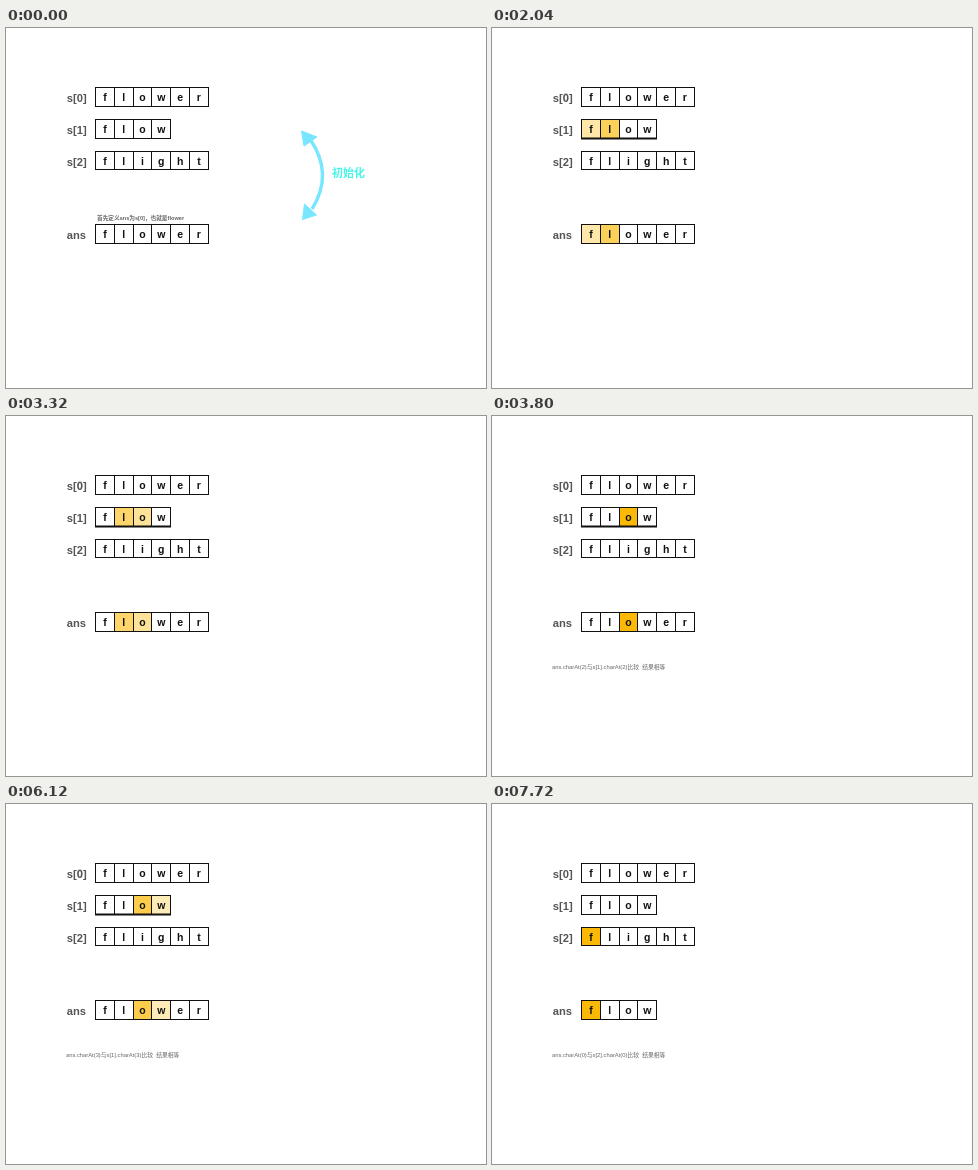
Animation of 480 by 360 pixels, one loop 8 s. Source, as an HTML page:

```html
<!DOCTYPE html>
<html>
<head>
<meta charset="utf-8">
<title>Longest common prefix</title>
<style>
html, body { margin: 0; width: 100%; height: 100%; overflow: hidden; background: #fff; }
svg { display: block; width: 480px; height: 360px; }
text { font-family: "Liberation Sans", "Noto Sans CJK SC", "Noto Sans CJK", sans-serif; white-space: pre; }
.label { font-size: 11.2px; font-weight: bold; fill: #555; }
.letter { font-size: 10.5px; font-weight: bold; fill: #111; text-anchor: middle; }
.note { font-size: 5.8px; fill: #666; }
.line { fill: none; stroke: #111; stroke-width: 1; }
.mark { fill: #fbb905; }
</style>
</head>
<body>
<svg id="stage" viewBox="0 0 480 360"></svg>
<script>
const LOOP = 8000, LEFT = 89.5, CELL = 18.8;
const NS = "http://www.w3.org/2000/svg";
const stage = document.getElementById("stage");

function add(parent, tag, attrs, text) {
  const el = document.createElementNS(NS, tag);
  for (const key in attrs) el.setAttribute(key, attrs[key]);
  if (text) el.textContent = text;
  parent.appendChild(el);
  return el;
}

const group = () => add(stage, "g", {});
const edge = i => Math.floor(LEFT + i * CELL) + 0.5;
const clamp = v => Math.min(1, Math.max(0, v));
const within = (t, from, to) => t >= from && t < to ? 1 : 0;
const show = (el, alpha) => el.setAttribute("opacity", alpha);

function addLabel(parent, name, y) {
  add(parent, "text", { class: "label", x: 60.8, y: y + 14 }, name);
}

// A row of boxed letters; returns the highlight of each cell.
function addWord(parent, word, y, height) {
  const marks = [...word].map((ch, i) => add(parent, "rect", {
    class: "mark", x: edge(i), y, width: edge(i + 1) - edge(i), height, opacity: 0
  }));
  add(parent, "rect", { class: "line", x: edge(0), y, width: edge(word.length) - edge(0), height });
  [...word].forEach((ch, i) => {
    if (i) add(parent, "path", { class: "line", d: `M${edge(i)} ${y}v${height}` });
    add(parent, "text", { class: "letter", x: LEFT + (i + 0.5) * CELL, y: y + 13.5 }, ch);
  });
  return marks;
}

const base = group();
["s[0]", "s[1]", "s[2]"].forEach((name, i) => addLabel(base, name, 59.5 + i * 32));
addLabel(base, "ans", 196.5);
addWord(base, "flower", 59.5, 19);
const second = addWord(base, "flow", 91.5, 19);
const third = addWord(base, "flight", 123.5, 18);

const fullAns = group(), shortAns = group();
const fullMarks = addWord(fullAns, "flower", 196.5, 19);
const shortMarks = addWord(shortAns, "flow", 196.5, 19);
show(shortMarks[0], 1);

// Doubled outlines visible while the second word is compared
const doubled = group();
add(doubled, "path", { d: `M89 110.5H${edge(4) + 0.5}`, stroke: "#111", "stroke-width": 2 });
add(doubled, "text", { class: "label", x: 70.8, y: 72.6, opacity: 0.35 }, "0");

const intro = group();
add(intro, "text", { class: "note", x: 91, y: 192, style: "font-weight:bold;font-size:5.65px" },
  "首先定义ans为s[0]，也就是flower");
add(intro, "path", { d: "M304 111Q328 146 306 181", fill: "none", stroke: "#78e6ff", "stroke-width": 3.4 });
add(intro, "path", { d: "M295.5 103L311 109L298 118ZM296.5 191.5L298.5 176L310.5 187Z",
  fill: "#78e6ff", stroke: "#78e6ff", "stroke-width": 1, "stroke-linejoin": "round" });
add(intro, "text", { x: 326, y: 149.3, fill: "#48f5e8", "font-size": 11, "font-weight": "bold" }, "初始化");

const compare = (word, i, gap) =>
  `ans.charAt(${i})与s[${word}].charAt(${i})比较${gap}结果相等`;

// text, start, end, fade-in time, fade-out time
const notes = [
  ["接下来从s[1]开始，将ans与数组中的每个字符串逐个字符进行比较，保留相等部分作为ans", 480, 1000, 0, 0],
  [compare(1, 0, " "), 1000, 1720, 0, 200],
  [compare(1, 1, "  "), 2160, 3160, 200, 200],
  [compare(1, 2, "  "), 3600, 4600, 200, 200],
  [compare(1, 3, "  "), 5040, 6760, 200, 0],
  ["ans与s[1]比较完毕，截取公共前缀flow给ans", 6760, 7720, 0, 0],
  [compare(2, 0, "  "), 7720, LOOP, 0, 0]
].map(([text, from, to, rise, fall]) => ({
  el: add(stage, "text", { class: "note", x: 60, y: 253 }, text), from, to, rise, fall
}));

function noteAlpha(n, t) {
  const up = n.rise ? clamp((t - n.from) / n.rise) : 1;
  const down = n.fall ? clamp((n.to - t) / n.fall) : 1;
  return within(t, n.from, n.to) * up * down;
}

// Each move dissolves the highlight from one cell to the next.
const moves = [1620, 3060, 5940];
const moved = (i, t) => clamp((t - moves[i]) / 640);

function draw(t) {
  show(intro, within(t, 0, 1000));
  show(doubled, within(t, 1000, 6760));
  show(fullAns, within(t, 0, 7240));
  show(shortAns, within(t, 7240, LOOP));
  show(shortMarks[0], within(t, 7720, LOOP));
  show(third[0], within(t, 7720, LOOP));
  for (let i = 0; i < 4; i++) {
    const rise = i ? moved(i - 1, t) : 1;
    const fall = i < 3 ? 1 - moved(i, t) : 1;
    const alpha = within(t, 1000, 7240) * rise * fall;
    show(second[i], alpha);
    show(fullMarks[i], alpha);
  }
  for (const n of notes) show(n.el, noteAlpha(n, t));
}

const begin = performance.now();
function tick() {
  draw((performance.now() - begin) % LOOP);
  requestAnimationFrame(tick);
}
tick();
</script>
</body>
</html>
```
